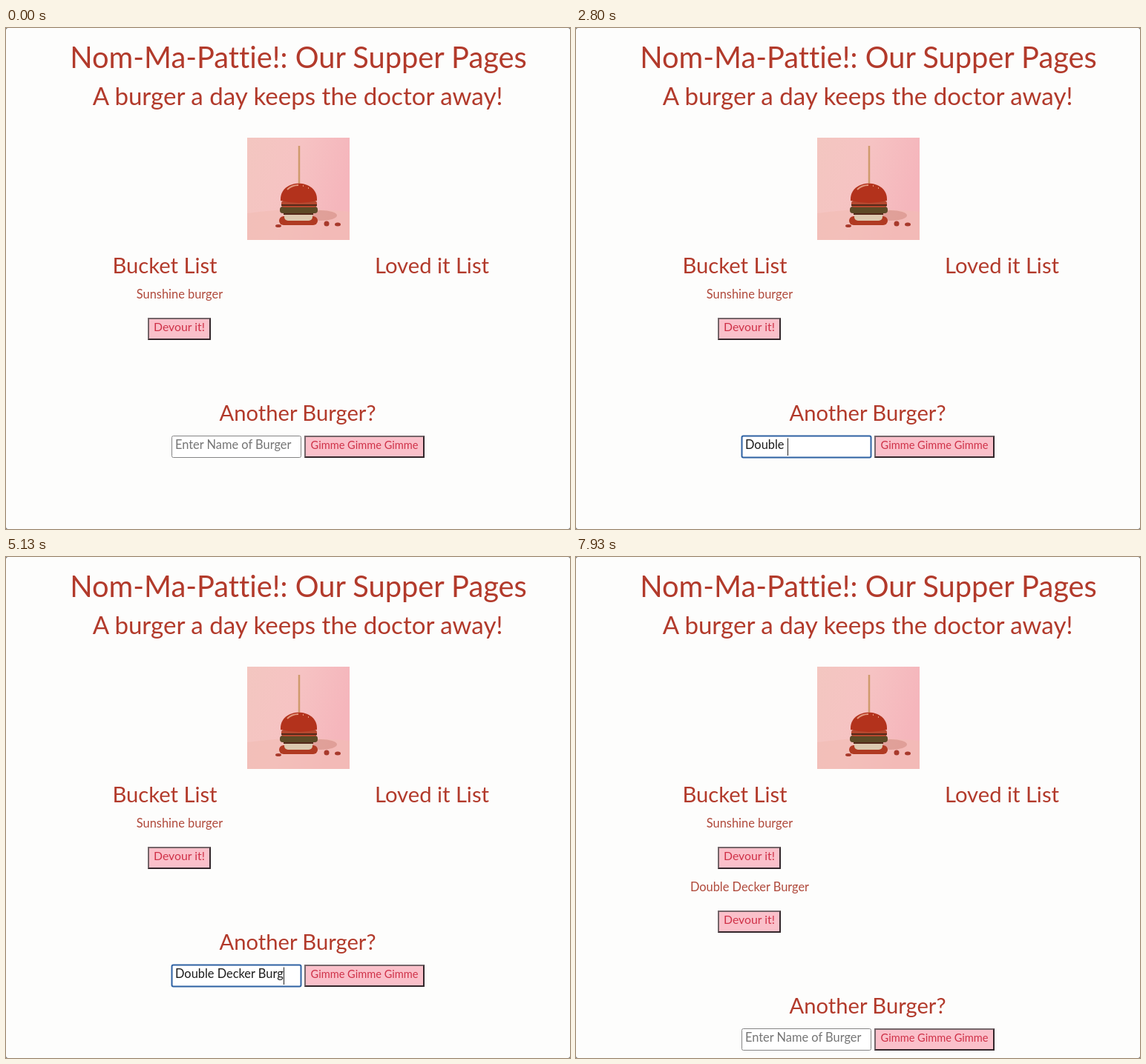
An HTML page that plays this animation: 760x676 px, repeating every 8000 ms.

```html
<!DOCTYPE html>
<html lang="en">
<head>
<meta charset="utf-8">
<title>Burger list</title>
<style>
  html, body { margin: 0; width: 100%; height: 100%; overflow: hidden; background: #666; }
  svg { display: block; width: 100%; height: 100%; }
  text {
    font: 16.4px Lato, sans-serif; font-variant-ligatures: none;
    fill: #b04a3c; text-anchor: middle; white-space: pre;
  }
  .title { font-size: 39.8px; }
  .subtitle { font-size: 33.1px; }
  .heading { font-size: 29.2px; }
  .title, .subtitle, .heading { fill: #b23a2b; }
  .label { fill: #cf3148; }
  .entry { text-anchor: start; }
</style>
</head>
<body>
<svg viewBox="0 0 760 676">
  <defs>
    <linearGradient id="wall" x2="1" y2="0.25">
      <stop stop-color="#f3c6c0"/>
      <stop offset="0.5" stop-color="#f6c3c3"/>
      <stop offset="1" stop-color="#f5b6bc"/>
    </linearGradient>
  </defs>
  <rect width="760" height="676" rx="3" fill="#fdfdfc"/>
  <text class="title" x="394" y="54">Nom-Ma-Pattie!: Our Supper Pages</text>
  <text class="subtitle" x="393" y="104">A burger a day keeps the doctor away!</text>

  <g id="photo">
    <rect x="325" y="148" width="138" height="138" fill="url(#wall)"/>
    <path d="M325 250Q390 240 463 248V286H325Z" fill="#f2bcb4" opacity=".6"/>
    <ellipse cx="424" cy="253" rx="22" ry="7" fill="#d9948c" opacity=".7"/>
    <path d="M395 159V212" stroke="#cf9a6c" stroke-width="2.5"/>
    <rect x="368" y="254" width="52" height="12" rx="6" fill="#b03a22"/>
    <rect x="375" y="247" width="38" height="13" rx="5" fill="#dccab0"/>
    <rect x="369" y="241" width="51" height="9" rx="4" fill="#5c4a26"/>
    <rect x="371" y="233" width="48" height="9" rx="4" fill="#b5482f"/>
    <path d="M371 239H419M374 251H414" stroke="#54291a" stroke-width="2"/>
    <path d="M370 233C368 202 421 202 419 233Q395 239 370 233Z" fill="#b3321c"/>
    <path d="M379 218Q385 212 394 212M400 213l1 0M407 216l1 0" fill="none" stroke="#e2977c" stroke-width="2"/>
    <g fill="#a83a2c">
      <ellipse cx="367" cy="267" rx="4" ry="2"/>
      <circle cx="432" cy="264" r="3.5"/>
      <ellipse cx="447" cy="265" rx="4" ry="2.5"/>
    </g>
  </g>

  <text class="heading" x="214" y="331">Bucket List</text>
  <text class="heading" x="574" y="331">Loved it List</text>
  <g id="firstItem"></g>
  <g id="secondItem" transform="translate(0 86)"></g>

  <g id="form">
    <text class="heading" x="393" y="530">Another Burger?</text>
    <rect id="box" x="223.5" y="550.5" width="174" height="29" rx="2" fill="#fff"/>
    <text id="entry" class="entry" x="228" y="568"></text>
    <path id="caret" d="M0 553.5V577" stroke="#222"/>
    <g id="submit"></g>
  </g>
</svg>
<script>
const $ = id => document.getElementById(id);
const LOOP = 8000, FOCUS = 1350, KEY_GAP = 201, SUBMIT = 6270, ROW = 86;
const NAME = 'Double Decker Burger';

// Button with a two-pixel outset border
const button = (x, y, w, label, size) => `
  <rect x="${x}" y="${y}" width="${w}" height="30" fill="#33262a"/>
  <path d="M${x} ${y}h${w}l-2 2H${x + 2}v26l-2 2Z" fill="#75666a"/>
  <rect x="${x + 2}" y="${y + 2}" width="${w - 4}" height="26" fill="#fac0ca"/>
  <text class="label" x="${x + w / 2}" y="${y + 18}" style="font-size:${size}px">${label}</text>`;

const item = name =>
  `<text x="234" y="365">${name}</text>` + button(191, 391, 85, 'Devour it!', 15.8);

$('firstItem').innerHTML = item('Sunshine burger');
$('secondItem').innerHTML = item(NAME);
$('submit').innerHTML = button(402, 550, 162, 'Gimme Gimme Gimme', 14.6);

function show(id, on) {
  $(id).setAttribute('visibility', on ? 'visible' : 'hidden');
}

function draw(t) {
  const submitted = t >= SUBMIT;
  const focused = t >= FOCUS && !submitted;
  const typed = focused ? NAME.slice(0, Math.floor((t - FOCUS) / KEY_GAP)) : '';
  const entry = $('entry');

  entry.textContent = typed || 'Enter Name of Burger';
  entry.style.fill = typed ? '#1c1c1c' : '#757575';
  $('box').setAttribute('stroke', focused ? '#2f62a3' : '#858585');
  $('box').setAttribute('stroke-width', focused ? 2 : 1);

  const caretX = 228.5 + Math.round(typed ? entry.getComputedTextLength() : 0);
  $('caret').setAttribute('transform', `translate(${caretX} 0)`);
  show('caret', focused);
  show('secondItem', submitted);
  $('form').setAttribute('transform', `translate(0 ${submitted ? ROW : 0})`);
}

const start = performance.now();
function tick() {
  draw((performance.now() - start) % LOOP);
  requestAnimationFrame(tick);
}
tick();
</script>
</body>
</html>
```
